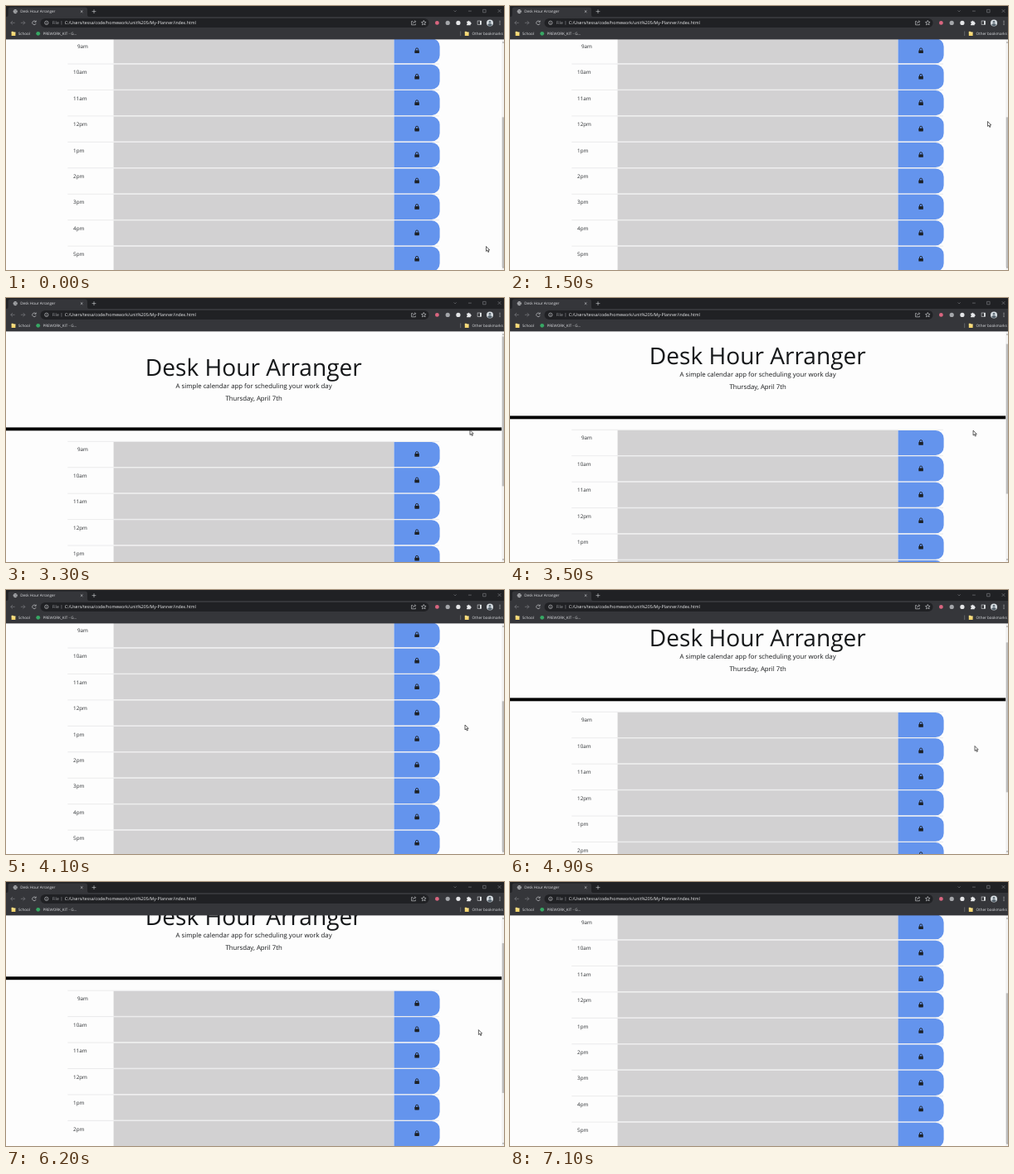
An HTML page that plays this animation: 600 px wide and 319 px high, repeating every 7.2 s.

```html
<!DOCTYPE html>
<html lang="en">
<head>
<meta charset="utf-8">
<title>Desk Hour Arranger</title>
<style>
  html, body { margin: 0; width: 100%; height: 100%; overflow: hidden; background: #fdfdfd; }
  svg { display: block; width: 600px; height: 319px; }
  text { font-family: "Open Sans", "Noto Sans", sans-serif; text-rendering: geometricPrecision; white-space: pre; }
  .mid { text-anchor: middle; fill: #151719; }
  .hour { font-size: 6.25px; fill: #2b2e31; }
  .ui { font-size: 4.55px; fill: #dfe1e4; }
  .line { fill: none; stroke: #d5d7da; stroke-width: .6; }
  .dim { stroke: #85878b; }
</style>
</head>
<body>
<svg viewBox="0 0 600 319">
  <defs>
    <g id="lock" fill="#1d2126">
      <rect x="-2.75" y="-.6" width="5.5" height="3.7" rx=".6"/>
      <path d="M-1.6-.3V-1.5a1.6 1.6 0 0 1 3.2 0V-.3" fill="none" stroke="#1d2126" stroke-width=".95"/>
    </g>
    <g id="folder">
      <path d="M-2.4-2.5h2l.7.7h2.1v4.5h-4.8z" fill="#f6d66f"/>
      <path d="M-2.4-1h4.8" stroke="#fff0b5" stroke-width=".6"/>
    </g>
  </defs>

  <rect width="600" height="319" fill="#fdfdfd"/>
  <g id="page">
    <text class="mid" x="298.3" y="93.9" font-size="28.1">Desk Hour Arranger</text>
    <text class="mid" x="298.6" y="109.4" font-size="7.81">A simple calendar app for scheduling your work day</text>
    <text class="mid" x="298.6" y="123.8" font-size="7.81">Thursday, April 7th</text>
    <rect y="156.4" width="597.4" height="3.9"/>
    <g id="rows"></g>
  </g>

  <rect x="597.4" y="40" width="2.6" height="279" fill="#f1f1f1"/>
  <rect id="thumb" x="597.7" y="46.4" width="2.3" height="181" fill="#bcbcbc"/>
  <path d="M598 44.4l1-1.5 1 1.5zM598 315.6l1 1.5 1-1.5z" fill="#777"/>

  <rect width="600" height="40.4" fill="#35363a"/>
  <rect width="600" height="13" fill="#202124"/>
  <path d="M0 13q2.6 0 2.6-2.6V4.4Q2.6 1.6 5.4 1.6H95.2Q98 1.6 98 4.4V10.4Q98 13 100.6 13z" fill="#35363a"/>
  <g class="line">
    <circle cx="11.2" cy="6.6" r="2.2"/>
    <path d="M9 6.6h4.4M11.2 4.4q-2 2.2 0 4.4q2-2.2 0-4.4"/>
    <path d="M89.9 5.3l2.6 2.6m0-2.6l-2.6 2.6M106 4.2v4.8m-2.4-2.4h4.8"/>
    <path d="M539.6 5.4l1.5 1.5 1.5-1.5M557 6.1h3.8M574.6 4.3h3.5v3.5h-3.5zM592.7 4.2l3.6 3.6m0-3.6l-3.6 3.6" class="dim"/>
  </g>
  <text class="ui" x="17.2" y="8.3" font-size="4.5">Desk Hour Arranger</text>

  <rect x="41.5" y="14.9" width="468" height="11" rx="5.5" fill="#202124"/>
  <g class="line">
    <path class="dim" d="M10.7 20.3H5.7m2.3-2.3l-2.3 2.3 2.3 2.3M17.9 20.3h5m-2.3-2.3l2.3 2.3-2.3 2.3"/>
    <path d="M35.8 18.9a2.3 2.3 0 1 0 .4 2.1M36.2 17.5v1.8h-1.8"/>
    <circle cx="48.8" cy="20.3" r="2.2"/>
    <path d="M48.8 20v1.5M48.8 18.8v.5"/>
    <path class="dim" d="M66.9 18v4.7"/>
    <path d="M490.2 18.5h-1.6v4.3h4.8v-1.4M490.3 21.2q.3-2.4 3.2-2.4m-1.2-1.3l1.4 1.3-1.4 1.4"/>
    <path d="M503.3 17.5l.8 1.8 2 .2-1.5 1.3.5 2-1.8-1-1.8 1 .5-2-1.5-1.3 2-.2z"/>
    <rect x="568.1" y="18" width="4.5" height="4.5"/>
  </g>
  <rect x="571" y="18" width="1.7" height="4.5" fill="#e2e4e6"/>
  <circle cx="519.4" cy="20.4" r="2.4" fill="#d9657f"/>
  <circle cx="532.2" cy="20.4" r="2.6" fill="#a4a6aa"/>
  <circle cx="544.9" cy="20.4" r="2.6" fill="#e4e5e7"/>
  <path d="M555.1 18.7h1.3a1 1 0 0 1 2 0h1.3v1.3a1 1 0 0 1 0 2v1.2h-4.6v-1.3a1 1 0 0 0 0-1.9z" fill="#e8e9eb"/>
  <circle cx="583" cy="20.4" r="4" fill="#d5dbe0"/>
  <path d="M580.2 23q.5-2 2.8-2t2.8 2q-2.8 2.6-5.6 0z" fill="#59666f"/>
  <circle cx="583" cy="19.3" r="1.3" fill="#59666f"/>
  <g fill="#dfe1e4">
    <circle cx="595" cy="18.3" r=".55"/><circle cx="595" cy="20.3" r=".55"/><circle cx="595" cy="22.3" r=".55"/>
  </g>
  <text x="55.7" y="22.2" font-size="5.1" fill="#9fa2a6">File</text>
  <text x="70.8" y="22.2" font-size="5.19" fill="#f0f1f3">C:/Users/tessa/code/homework/unit%205/My-Planner/index.html</text>

  <use href="#folder" x="9" y="33.3"/>
  <text class="ui" x="14.8" y="35">School</text>
  <circle cx="38.7" cy="33.3" r="2.4" fill="#37a864"/>
  <text class="ui" x="44.4" y="35">PREWORK_KIT - G...</text>
  <path class="line dim" d="M547.7 30.5v5.6"/>
  <use href="#folder" x="555.2" y="33.3"/>
  <text class="ui" x="561.5" y="35">Other bookmarks</text>

  <path id="cursor" d="M0 0V5.9L1.4 4.7 2.4 7 3.4 6.5 2.4 4.4H4.2Z" fill="#fff" stroke="#111" stroke-width=".65" stroke-linejoin="round"/>
</svg>
<script>
const LOOP = 7200, STEP = 100, PITCH = 31.44, BOTTOM = 134.7, REST = 9.7;
const $ = id => document.getElementById(id);

const hours = ["9am", "10am", "11am", "12pm", "1pm", "2pm", "3pm", "4pm", "5pm"];
$("rows").innerHTML = hours.map((hour, i) => `
  <g transform="translate(0 ${173.7 + i * PITCH})">
    <path d="M74.3-.4H522" stroke="#e9e9ea" stroke-width=".9"/>
    <text class="hour" x="${i ? 81.1 : 85.9}" y="11.8">${hour}</text>
    <rect x="129.6" y=".2" width="338" height="30.1" fill="#d2d1d2"/>
    <path d="M467.6.2H512.8a9.8 9.8 0 0 1 9.8 9.8V20.5a9.8 9.8 0 0 1-9.8 9.8H467.6z" fill="#6494ed"/>
    <use href="#lock" x="495.1" y="15"/>
  </g>`).join("");

// Keys are [time, ...values].
const scrollKeys = [
  [0, BOTTOM], [1800, BOTTOM], [2300, 0], [2600, 0], [3000, BOTTOM], [3300, 0],
  [3400, 0], [3900, BOTTOM], [4300, BOTTOM], [4900, 26], [5000, REST],
  [6000, REST], [6600, BOTTOM], [LOOP, BOTTOM]
];
const cursorKeys = [
  [0, 578.5, 290.5], [1500, 575.5, 139.5], [1600, 563, 153], [1700, 553, 157.5],
  [1900, 553, 157.5], [3300, 559, 159.5], [4100, 553, 163], [4900, 560, 188.5],
  [5500, 559.6, 188.3], [5800, 566.5, 179], [6000, 566.5, 179], [6700, 581, 177],
  [LOOP, 581, 177]
];

function sample(keys, t) {
  const i = keys.findIndex(key => key[0] > t);
  const [a, b] = [keys[i - 1], keys[i]];
  const u = (t - a[0]) / (b[0] - a[0]);
  const eased = u * u * (3 - 2 * u);
  return a.slice(1).map((v, k) => v + (b[k + 1] - v) * eased);
}

function draw(t) {
  const [scroll] = sample(scrollKeys, t);
  const [x, y] = sample(cursorKeys, t);
  $("page").setAttribute("transform", `translate(0 ${-scroll})`);
  $("thumb").setAttribute("y", 46.4 + scroll * .653);
  $("cursor").setAttribute("transform", `translate(${x} ${y})`);
  $("cursor").setAttribute("visibility", t < 6800 ? "visible" : "hidden");
}

function tick() {
  draw(Math.floor(performance.now() % LOOP / STEP) * STEP);
  requestAnimationFrame(tick);
}
tick();
</script>
</body>
</html>
```
